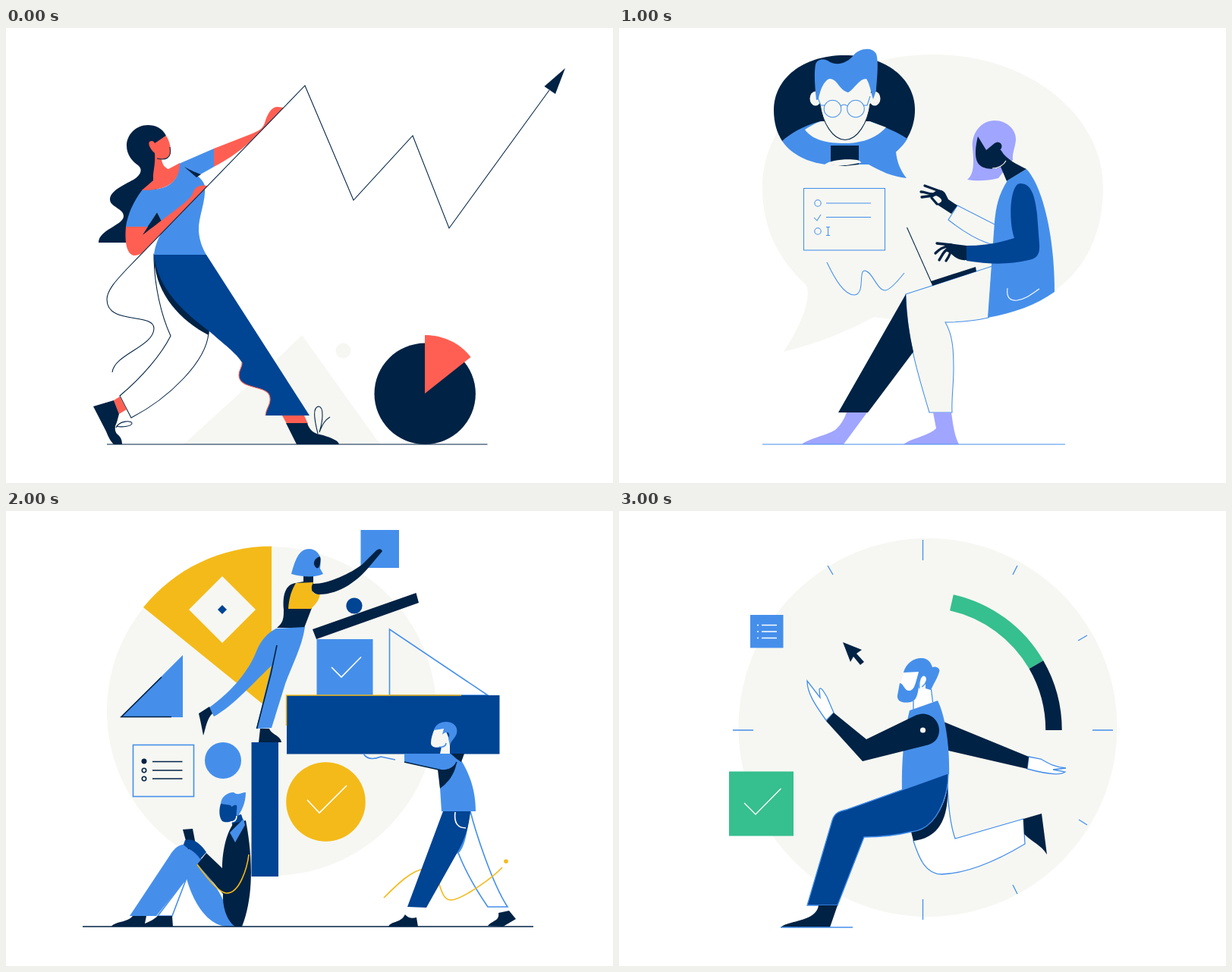
An HTML page that plays this animation: 800 by 600 pixels, repeating every 4 s.

```html
<!DOCTYPE html>
<html lang="en">
<head>
<meta charset="utf-8">
<title>Four scenes</title>
<style>
html, body { margin: 0; width: 100%; height: 100%; overflow: hidden; background: #fff; }
svg { display: block; width: 800px; height: 600px; }
.scene { opacity: 0; fill: none; stroke-width: 1.3; }
.fine { stroke-width: 1.05; }
.bold { stroke-width: 1.6; }
.navy { fill: #002244; }
.deep { fill: #004494; }
.blue { fill: #458feb; }
.cream { fill: #f6f7f2; }
.white { fill: #fff; }
.coral { fill: #ff5f52; }
.lilac { fill: #a0a5ff; }
.gold { fill: #f4ba19; }
.green { fill: #36bf8f; }
.ln { stroke: #002244; }
.lb { stroke: #458feb; }
.lw { stroke: #fff; }
.lc { stroke: #ff5f52; }
.lg { stroke: #f4ba19; }
.finger { stroke-width: 3.3; stroke-linecap: round; stroke-linejoin: round; }
</style>
</head>
<body>
<svg viewBox="0 0 800 600">

<!-- Growth line -->
<g class="scene fine">
  <path class="cream" d="M234 549L357 437 390 405 493 549Z"/>
  <circle class="cream" cx="444.500" cy="425.500" r="10"/>
  <circle class="navy" cx="552.200" cy="482.300" r="66.700"/>
  <path class="coral" d="M552 482V405C576 405 598 415 612.500 434Z"/>
  <path class="navy" d="M211 142C206 132 197 128 187 128C171 128 159 141 159 155C159 168 167 176 174 181C180 186 179 193 168 200C155 207 137 215 137 226C137 236 155 238 155 248C155 260 122 266 122 283H185L200 205 197 152Z"/>
  <path class="white ln" d="M195 299C195 340 205 380 217 406C205 430 180 460 150 485L165 514C215 488 264 440 267 402Z"/>
  <path class="coral" d="M142 491L150 486 159 503 149 509Z"/>
  <path class="navy" d="M115 499L142 491 149 509 146 520C143 526 143 531 146 535C152 540 153 544 153 549H142C138 545 135 540 132 532Z"/>
  <path class="ln" d="M145 527C150 517 164 518 166 521C167 525 152 527 146 525"/>
  <path class="coral" d="M364 511H393L398 522H370Z"/>
  <path class="navy" d="M369 521H397C400 530 405 535 418 537C430 541 438 544 439 549H383Z"/>
  <path class="ln" d="M411 535C406 515 404 500 412 499C420 500 417 520 413 533C417 523 420 517 427 513"/>
  <path class="navy" d="M195 299C195 348 228 385 267 405L268 399Z"/>
  <path class="deep" d="M195 299H264L400 511H342C343 500 349 498 348 488C348 470 307 478 307 458C307 450 312 447 311 441C305 430 285 415 268 400C235 375 200 345 195 299Z"/>
  <path class="lc" d="M342 511C343 500 349 498 348 488C348 470 307 478 307 458C307 450 312 447 311 441"/>
  <path class="blue" d="M228 179L274 159V183L251 196L236 183C245 190 259 197 262 208C264 229 253 249 254 268C255 282 260 292 264 299H195C196 290 199 280 204 272V254L199 243 187 262H158C160 247 168 228 180 213C212 215 228 204 228 179Z"/>
  <path class="coral" d="M196 152L211 142C215 148 217 155 217 162C217 170 211 174 205 173C206 180 209 184 214 186L229 178C229 204 212 214 179 214L194 201V194C195 185 197 175 196 165C190 160 187 153 189 150C192 148 195 149 196 152Z"/>
  <path class="ln" d="M216 157C219 172 210 175 199 172"/>
  <path class="navy" d="M235 183C244 188 251 191 257 193L251 197Z"/>
  <path class="coral" d="M274 159L320 141C335 135 338 133 341 125C345 112 350 104 358 104L366 105 338 134C325 147 310 164 274 183Z"/>
  <path class="navy" d="M199 243L179 274 205 255Z"/>
  <path class="coral" d="M158 262C156 285 160 299 169 300C176 300 181 296 185 291L266 208C255 206 249 209 246 218C243 226 235 231 180 273L187 262Z"/>
  <path class="ln" d="M140 454C143 430 195 420 195 396C195 375 133 392 133 358C133 345 147 331 160 317L394 76 458 227 536 142 584 264 716 82"/>
  <path class="navy" d="M737 53L709.500 77 724 87Z"/>
  <path class="ln" d="M133 549H634.500"/>
</g>

<!-- Chat -->
<g class="scene fine">
  <path class="cream" d="M414 35C285 35 189 115 189 210C189 270 215 310 246 338C254 350 245 385 217 427C265 415 305 398 336 381C360 385 385 386 414 386C555 390 638 326 638 210C638 115 540 35 414 35Z"/>
  <path class="navy" d="M297 36C352 36 390 67 390 108C390 130 380 150 365 163L329 180 215 149C208 138 204 125 204 108C204 67 242 36 297 36Z"/>
  <path class="blue" d="M215 149C225 140 240 130 265 123H331C350 130 368 138 380 146C376 153 371 158 365 163C366 176 371 188 379 198C360 196 345 189 329 180H272C250 177 228 168 215 149Z"/>
  <path class="cream" d="M245 134C256 127 262 124 267 123H330L352 131C335 150 310 152 297 152C275 152 255 148 245 134Z"/>
  <g class="cream">
    <ellipse cx="259" cy="93" rx="7.500" ry="9.500"/>
    <ellipse cx="337" cy="93" rx="7.500" ry="9.500"/>
    <path d="M263 65H333L331 100C328 125 314 147.500 298 147.500C282 147.500 268 125 265 100Z"/>
  </g>
  <path class="ln" d="M265 100C268 125 282 147.500 298 147.500C314 147.500 328 125 331 100"/>
  <path class="blue" d="M260 95C258 75 257 60 259 48C261 42 267 40 275 43C288 52 302 45 309 36C316 27 333 24 339 34C343 45 339 75 339 82L335 94C332 85 331 75 326 67C316 67 311 80 302 85C290 82 288 67 278 67C270 68 264 85 263 94Z"/>
  <g class="lb">
    <circle cx="281.500" cy="106.500" r="11.300"/>
    <circle cx="312" cy="106.500" r="11.300"/>
    <path d="M292 103Q297 99 301 103M262 92L266 102H271M331 90L327 102H322"/>
    <rect x="243.500" y="211.500" width="107" height="81.500"/>
    <circle cx="262" cy="231" r="4.200"/>
    <circle cx="262" cy="268" r="4.200"/>
    <path d="M257 250L261 254 266 246M273 231H332M273 249.500H332M273 262.500H278M273 273.500H278M275.500 262.500V273.500"/>
    <path d="M274 309C285 332 297 352 310 352C325 351 315 320 324 320C334 321 340 346 351 346C358 345 368 333 376 323"/>
  </g>
  <path class="navy" d="M279 155H316V180L298 182 279 180Z"/>
  <path class="cream" d="M271 180C278 174 300 172 314 174C320 176 320 178 317 178L300 181C290 181 280 181 271 180Z"/>

  <path class="lilac" d="M466 158C464 138 478 122 495 122C512 122 524 135 523 148C522 158 518 165 519 174L500 198C485 202 470 202 459 200C468 193 468 178 466 158Z"/>
  <path class="navy" d="M473 143C470 155 468 170 473 178C478 186 492 188 503 183L511 202 537 186C525 180 510 173 504 162L495 152 484 161Z"/>
  <circle class="navy" cx="499" cy="156" r="5.500"/>
  <path class="lw" d="M492 185C500 185 507 181 510 175"/>
  <path class="cream lb" d="M446 234L499 261 494 286C473 281 452 267 434 253Z"/>
  <path class="navy" d="M446 234L438 245 418 232C425 231 429 227 420 222C417 219 411 226 411 222C416 213 425 211 430 218L434 226Z"/>
  <path class="ln finger" d="M425 216L403 208M418 218C410 221 405 216 398 216M414 221L399 223M412 224L419 232"/>
  <path class="cream lb" d="M378 351L492 314 487 382C465 387 450 388 430 388C440 405 441 425 441 450C441 470 438 490 439 507H409C395 460 379 410 378 351Z"/>
  <path class="navy" d="M378 351C379 380 383 405 388 427L328 507H289Z"/>
  <path class="blue" d="M512 201L537 186C557 207 574 270 574 348C550 365 520 376 486 382L495 255C497 235 500 220 512 201Z"/>
  <path class="deep" d="M529 205C543 205 548 220 551 245L554 285C555 300 550 304 540 306C515 312 490 312 458 307V287C480 287 500 284 521 277C513 255 515 205 529 205Z"/>
  <path class="lw" d="M512 343C510 357 517 360 525 359C537 357 545 350 554 344"/>
  <path class="navy" d="M458 287V306C448 307 442 302 437 297L430 294 435 284Z"/>
  <path class="ln finger" d="M438 286L419 284M436 288C427 288 422 292 417 297M436 290C428 293 426 300 422 306M438 293C436 298 435 302 431 307"/>
  <path class="ln" d="M379.500 263L412 336"/>
  <path class="navy" d="M411 334L470 315 471 321 413 340Z"/>
  <path class="lilac" d="M300 507H327L296 549H241C250 541 272 538 285 530C292 524 297 515 300 507ZM414 507H438C440 520 441 535 448 549H375C385 541 408 538 418 528Z"/>
  <path class="lb" d="M189 549H588"/>
</g>

<!-- Building blocks -->
<g class="scene bold">
  <circle class="cream" cx="350" cy="264" r="217"/>
  <path class="gold" d="M350 264V46.500C284 46.500 222 76 181 127Z"/>
  <path class="cream" d="M285 86L329 130 285 174 241 130Z"/>
  <path class="deep" d="M285 124L291 130 285 136 279 130Z"/>
  <path class="blue" d="M233 190V272H151Z"/>
  <path class="ln" d="M205 219L152 271.500H218"/>
  <rect class="lb" x="167.500" y="308.500" width="80" height="68"/>
  <g class="ln">
    <circle class="navy" cx="182" cy="330" r="2.700"/>
    <circle cx="182" cy="342" r="2.700"/>
    <circle cx="182" cy="353" r="2.700"/>
    <path d="M193 330.500H232.500M193 342H232.500M193 353H232.500"/>
  </g>
  <circle class="blue" cx="286" cy="329" r="24"/>
  <rect class="deep" x="323.500" y="305" width="35.500" height="177"/>
  <circle class="gold" cx="421.500" cy="383.500" r="52.300"/>
  <rect class="blue" x="409.500" y="169" width="74" height="74"/>
  <path class="lw" d="M397 381L413 398 449 362M429 206L442 219 468 192.500"/>
  <path class="lb" d="M505.500 156V243H635Z"/>
  <rect class="deep" x="370" y="243" width="280.500" height="77.500"/>
  <path class="lg" d="M369.500 283V243H600"/>
  <rect class="blue" x="467.500" y="25" width="50.500" height="50"/>
  <path class="navy" d="M404 156L540.500 108 544 121 409 169Z"/>
  <circle class="deep" cx="459" cy="125" r="10.600"/>

  <path class="navy" d="M366 130C364 108 370 96 382 95L392 93V83H405V94L403 128 393 154H357C366 147 366 140 366 130Z"/>
  <path class="gold" d="M382 95L405 94C400 105 405 112 414 109C413 118 407 124 402 129H372C373 115 376 105 382 95Z"/>
  <path class="navy" d="M405 96C425 96 455 82 470 70L488 52C492 49 495 50 496 53L480 72C465 91 440 110 413 110C402 110 401 99 405 96Z"/>
  <path class="blue" d="M376 83C381 65 386 50 399 50C409 50 413 57 415 63L414 76 418 83C408 88 390 87 376 83Z"/>
  <path class="navy" d="M414 60C406 62 403 70 409 75C413 77 415 70 414 60Z"/>
  <path class="blue" d="M356 155L394 153C390 180 376 205 368 228L350 286 330 287 350 204C330 222 300 257 274 271L268 259C300 236 320 210 330 185C335 172 345 160 356 155Z"/>
  <path class="ln" d="M357 177L349 215 330.500 287"/>
  <path class="navy" d="M335 287H347C350 295 362 296 363 305H333ZM268 258L272 267C264 275 263 288 260 296C258 285 256 275 254 267Z"/>

  <path class="white lb" d="M238 484L219 534H200Z"/>
  <path class="blue" d="M163 534L216 454C225 439 236 436 247 443L258 459 253 466C275 490 287 510 290 525L302 548H290C262 545 245 510 238 485L198 534Z"/>
  <path class="navy" d="M139 548C143 541 160 543 167 534H185L183 544C190 541 196 538 200 534H219L220 548Z"/>
  <path class="deep" d="M297 403L310 400 314 412 299 424Z"/>
  <path class="navy" d="M300 412L316 408C322 440 330 500 311 548H302C290 540 285 520 286 505C275 492 262 476 252 466L264 451 285 471C285 450 290 425 300 412Z"/>
  <path class="blue" d="M295 424L313 406 315 414 302 437Z"/>
  <path class="blue" d="M283 387C283 377 292 371 300 371C306 376 311 371 316 371C316 385 310 396 306 402L298 396Z"/>
  <path class="deep" d="M283 386L296 388C298 393 299 386 304 388C305 394 303 396 304 402C302 410 290 412 285 409C280 403 281 392 283 386Z"/>
  <path class="lw" d="M296 410C301 410 304 407 304 402"/>
  <path class="lg" d="M252 466C262 480 280 504 291 504C308 504 318 470 320 453"/>
  <path class="navy" d="M233 420L246 419 251 445 240 446Z"/>
  <path class="deep" d="M236 434C246 431 256 438 264 450L256 459C248 447 238 445 234 440Z"/>

  <path class="white lb" d="M612 396C618 420 640 490 661 522H635C620 500 605 475 595 448Z"/>
  <path class="lg" d="M498 510C515 493 535 473 552 472C575 472 568 512 586 513C600 513 640 485 654 470"/>
  <circle class="gold" cx="659" cy="462" r="2.800"/>
  <path class="blue" d="M611 397L594 452C602 450 608 430 611 397Z"/>
  <path class="deep" d="M576 396H612C610 420 602 438 595 450L554 523 529 522Z"/>
  <path class="lw" d="M592 397C590 412 596 418 606 418"/>
  <path class="navy" d="M504 548C508 540 520 544 526 532C531 538 536 537 541 536L543 548ZM635 547C640 540 651 541 649 530L663 527 672 538 655 548Z"/>
  <path class="blue" d="M525 320H594C612 345 619 370 619 396H574L572 365 570 341 525 331Z"/>
  <path class="navy" d="M569 341C580 344 590 340 594 331C591 350 580 360 572 366ZM586 320H604L600 331 594 327Z"/>
  <path class="ln" d="M525 331L570 341C580 344 590 340 594 331"/>
  <path class="lb" d="M471 320C476 328 484 328 494 324L513 328"/>
  <path class="cream" d="M565 287L578 286 585 303V320H572L574 311C566 313 560 311 560 306C560 300 562 294 565 287Z"/>
  <path class="blue" d="M564 289C566 282 572 278 580 278C590 278 596 285 594 293C592 300 587 302 585 309L583 300C587 292 581 289 575 295L577 287Z"/>
  <path class="lb" d="M571 311C577 312 580 309 580 306"/>
  <path class="ln" d="M101 548H695"/>
</g>

<!-- Running against the clock -->
<g class="scene">
  <circle class="cream" cx="407" cy="285.500" r="249.500"/>
  <path class="lb" d="M400.500 38V65M400.500 512V539M150 289H177M624 289H651M275 72L282 84M525 72L519 84M617 164L605 171M606 407L617 414M519 493L525 505"/>
  <g stroke-width="21.500">
    <path stroke="#36bf8f" d="M438.400 120.700A172.500 172.500 0 0 1 549.900 202.700"/>
    <path class="ln" d="M549.900 202.700A172.500 172.500 0 0 1 573 289"/>
  </g>
  <rect class="blue" x="173" y="137" width="43.500" height="43.500"/>
  <path class="lw" d="M182 150.500H184M182 159H184M182 167.500H184M188 150.500H208M188 159H208M188 167.500H208"/>
  <rect class="green" x="145" y="343.500" width="85" height="85"/>
  <path class="lw" d="M165 385L180 400 213.500 366"/>
  <path class="navy" d="M295 173L320 183 313 188 323 199 318 203 309 192 305 199Z"/>

  <path class="white lb" d="M433 362C434 390 437 415 443 432L533 406 535 439C500 460 460 478 425 479C405 479 396 460 388 435Z"/>
  <path class="navy" d="M533 406L557 399 564 453C556 440 545 437 534 426Z"/>
  <path class="navy" d="M385 423C415 415 430 390 433 362C435 405 422 431 388 435Z"/>
  <path class="white lb" d="M540 324L556 327C566 333 575 338 589 339L572 341 588 344C580 350 560 346 538 340Z"/>
  <path class="navy" d="M428 278L540 324 538 340 434 316Z"/>
  <path class="white" d="M388 240L412 232 414 251 388 262Z"/>
  <path class="lb" d="M388 250V262M411.500 235L413.500 252"/>
  <path class="blue" d="M383 263L420 250C430 270 436 310 435 347L373 368C372 330 376 290 383 263Z"/>
  <path class="white" d="M376 212H397L400 235 378 242 371 227Z"/>
  <path class="blue" d="M375 213C378 200 390 193 400 194C408 195 411 200 413 206C418 204 424 208 422 212C420 220 416 225 411 236L404 234V222C404 215 398 216 396 224C394 238 394 250 384 252C372 254 366 250 367 243L370 227C375 227 376 237 382 237C388 237 390 230 392 223L395 212Z"/>
  <path class="white lb" d="M396 234C395 222 398 216 403 217C408 220 405 228 399 232"/>
  <path class="deep lb" d="M434 346C434 375 420 420 385 423C365 428 345 430 323 430L288 520H248L281 408C284 398 290 396 299 394Z"/>
  <path class="navy" d="M263 520H288L278 549H213C222 540 260 542 263 520Z"/>
  <path class="lb" d="M213 549H308"/>
  <path class="white lb" d="M283 266L274 245C268 235 266 232 264 235L265 246 248 224C248 240 258 255 273 276Z"/>
  <path class="navy" d="M283 266L326 301 392 269C408 263 422 275 422 289C422 300 415 307 405 309L321 330 273 277Z"/>
  <circle class="cream" cx="400.500" cy="289" r="3.600"/>
</g>
</svg>
<script>
const scenes = [...document.querySelectorAll('.scene')];
const hold = 1000;
const count = scenes.length;

scenes.forEach((scene, i) => {
  const steps = [];
  for (let k = 0; k <= count; k++) {
    steps.push({ offset: k / count, opacity: k === i ? 1 : 0, easing: 'steps(1, end)' });
  }
  scene.animate(steps, { duration: hold * count, iterations: Infinity });
});
</script>
</body>
</html>
```
